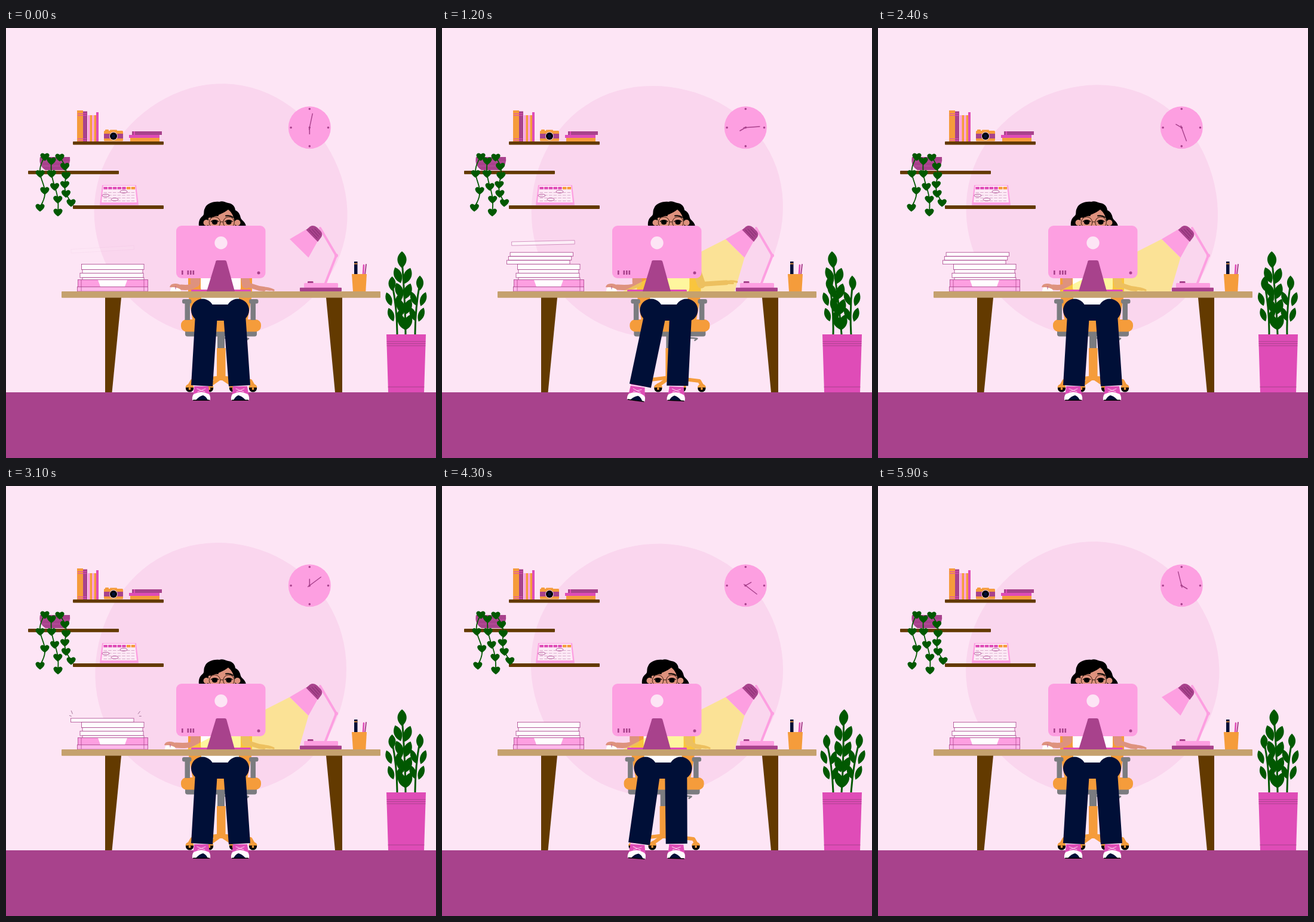
An HTML page that plays this animation: 720 by 720 pixels, repeating every 6 s.

```html
<!DOCTYPE html>
<html lang="en">
<head>
<meta charset="utf-8">
<title>Desk</title>
<style>
html,body{margin:0;width:100%;height:100%;overflow:hidden;background:#fde5f5}
svg{display:block;width:100vw;height:100vh}
</style>
</head>
<body>
<svg id="stage" viewBox="0 0 720 720"></svg>
<script>
const C = {bg:'#fde5f5', blob:'#fad6ee', floor:'#a8428c', desk:'#c5a16e', wood:'#633a00', pink:'#fd9fe1',
  mag:'#df4cb7', org:'#f59c3b', navy:'#000f37', green:'#015801', skin:'#de927e', gray:'#7b7c80', white:'#fffdfe'};
const LOOP = 6000, TAU = 2 * Math.PI;
const stage = document.getElementById('stage');

const mix = (a, b, k) => a + (b - a) * k;
const mixPt = (a, b, k) => a.map((v, i) => mix(v, b[i], k));
const times = (n, f) => Array.from({length: n}, (_, i) => f(i)).join('');

const rect = (x, y, w, h, f, r = 0, more = '') => `<rect x="${x}" y="${y}" width="${w}" height="${h}" fill="${f}" rx="${r}" ${more}/>`;
const poly = (p, f, more = '') => `<polygon points="${p}" fill="${f}" ${more}/>`;
const circ = (x, y, r, f, more = '') => `<circle cx="${x}" cy="${y}" r="${r}" fill="${f}" ${more}/>`;
const path = (d, f, more = '') => `<path d="${d}" fill="${f}" ${more}/>`;
const line = (d, c, w, more = '') => path(d, 'none', `stroke="${c}" stroke-width="${w}" stroke-linecap="round" stroke-linejoin="round" ${more}`);
const group = (id, s) => `<g id="${id}">${s}</g>`;
const thin = `stroke="${C.floor}" stroke-width=".8"`;
const paper = (x, y, w, h, f = C.white) => rect(x, y, w, h, f, 0, thin);

function books() {
  const stripe = (x, y, w) => rect(x, y, w, 1, C.mag);
  return rect(119, 138, 10, 52, C.org) + rect(129, 139.5, 7, 50.5, C.floor) + rect(151, 141, 4, 49, C.mag) +
    times(4, i => rect(137 + i * 3.5, 146, 3.5, 44, i % 2 ? C.org : C.pink)) +
    times(4, i => stripe(120, 143 + i * 3 + (i > 1 ? 36 : 0), 15)) +
    rect(211, 173, 50, 6, C.floor) + rect(206, 179, 51, 5, C.mag) + rect(208, 184, 49, 6, C.org) + rect(214, 173, 2, 6, C.mag);
}

function camera() {
  return rect(166, 170, 6, 4, C.org, 1) + rect(174, 170.5, 12, 4, C.org, 1) + rect(164, 172, 32, 17.5, C.org, 1.5) +
    rect(164, 177, 32, 8, C.floor) + circ(180, 181, 7, '#e9c6dc') + circ(180, 181, 6, '#000') + circ(180, 181, 3, C.navy);
}

function calendar() {
  const cell = i => rect(163.5 + i * 7.7, 266, 6.4, 4.2, i < 5 ? C.mag : C.org) +
    times(4, j => rect(163.5 + i * 7.7, 275 + j * 4.7, 5.5, .7, '#c98fb8'));
  const ring = (x, y) => `<ellipse cx="${x}" cy="${y}" rx="6" ry="2.4" fill="none" ${thin}/>`;
  return poly('161,263 218,263 222,296.5 157,296.5', C.pink) + poly('163,264 216,264 219,292 160,292', '#fdeaf6') +
    times(7, cell) + ring(197, 274) + ring(167, 280.5) + ring(182, 287);
}

const heart = (x, y, s = 7.5) => path('M0 1Q-1.15 .2 -1 -.4Q-.6 -1 0 -.5Q.6 -1 1 -.4Q1.15 .2 0 1Z', C.green,
  `transform="translate(${x} ${y}) scale(${s})"`);

// hearts hung at even steps along a wavy stem
function strand(id, a, b, n, wave) {
  const at = u => [mix(a[0], b[0], u) - wave * Math.sin(TAU * u), mix(a[1], b[1], u)];
  let d = 'M' + a;
  for (let u = .05; u < 1; u += .05) d += 'L' + at(u);
  return group(id, line(d, C.green, 1.8) + times(n, i => heart(...at(i / (n - 1)))));
}

function vines() {
  return path('M57 216H107Q109 229 98 238H66Q54 230 57 216Z', C.floor) + line('M58 224H106M60 231H104', '#c05aa8', .7) +
    strand('vineL', [65, 215], [57, 300], 4, 6) + strand('vineM', [76, 222], [87, 308], 5, 2.5) + strand('vineR', [90, 216], [109, 292], 6, -5);
}

const leaf = (x, y, len, wid, rot) => path(
  `M0 ${-len}C${wid * 1.4} ${-len * .4} ${wid * 1.3} ${len * .4} 0 ${len}C${-wid * 1.3} ${len * .4} ${-wid * 1.4} ${-len * .4} 0 ${-len}Z`,
  C.green, `transform="translate(${x} ${y}) rotate(${rot})"`);

// pairs of leaves at even steps below the tip
function branch(id, foot, tip, y, pairs, len, wid) {
  const pair = i => {
    const ly = y + 26 * (i + 1), x = mix(tip, foot, (ly - y) / (513 - y)), out = 8 - i;
    return leaf(x - out, ly, len, wid, -20) + leaf(x + out, ly + 1, len, wid, 20);
  };
  return group(id, line(`M${foot} 514Q${foot} 470 ${tip} ${y}`, C.green, 3) + leaf(tip, y, len, wid + 1, 0) + times(pairs, pair));
}

function plant() {
  return branch('stemL', 655, 646.5, 428, 2, 12, 5) + branch('stemR', 685, 693, 427, 2, 12.5, 5) + branch('stemC', 669, 663, 388, 4, 14, 6.5) +
    poly('637,513 703,513 700,610 640,610', C.mag) + times(3, i => line(`M638 ${525 + i * 3.5}H702`, C.floor, 1)) + line('M640 601H700', C.floor, 1);
}

function clock() {
  const dot = i => circ(508.3 + 31.2 * Math.cos(i * TAU / 4), 166.7 + 31.2 * Math.sin(i * TAU / 4), 1.8, C.floor);
  return circ(508.3, 166.7, 35.5, C.pink) + times(4, dot) + circ(508.3, 166.7, 1.7, C.floor) +
    line('M508.3 168V156', C.floor, 1.6, 'id="hour"') + line('M508.3 170V143', C.floor, 1.4, 'id="minute"');
}

function papers() {
  const loose = i => {
    const x = 108.5 + 2.8 * i, y = 389 - 6.6 * i;
    return group('paper' + i, paper(x, y, 105.5, 6.3)) +
      group('spark' + i, line(`M${x - 2} ${y - 6}l2 5M${x - 5} ${y + 2}l3 1M${x + 113} ${y - 5}l-3 4M${x + 115} ${y + 3}h-3`, '#8d5a80', .8));
  };
  return times(4, loose) + paper(126.5, 395.5, 104.5, 9) + paper(128, 404.5, 101, 6) + paper(124, 410.5, 106, 7.5) + paper(128, 418, 103, 4) +
    paper(120.5, 421.5, 117, 12, C.pink) + poly('154,422 203,422 199,433 158,433', C.white) +
    paper(119.5, 433.3, 118, 7.7, '#fdb9ea') + line('M126 422V440M231 422V440', C.floor, .7);
}

function lamp() {
  return line('M526 335L553 381L535 427', C.pink, 4) + circ(553, 381, 3, C.pink) +
    poly('475,353.5 503,337 523,355 506.5,384.5', C.pink) +
    path('M502.5 338L509 332.5Q515 329 521 334L527 340Q531 345 528 350L522 358Z', C.floor) +
    times(3, i => line(`M${508 + i * 4.5} ${338 - i}l${13 - 2 * i} ${14 - 2 * i}`, '#7d2c68', 1)) +
    rect(505, 424, 9.5, 4, C.floor, 1) + rect(499, 427, 57, 8, C.pink, 1.5) + rect(492, 434.8, 70, 6.3, C.floor, 1);
}

function cup() {
  return rect(583, 391, 5.5, 22, C.navy) + rect(583, 394, 5.5, 1.5, C.org) + line('M599 397l-1 16', C.mag, 2.6) +
    line('M603 396l-2 17', C.floor, 2) + poly('579,412 604,412 602.3,441 581,441', C.org);
}

const chairBack = () => path('M316 355H401Q412 355 412 366V446L404 492H313L305 446V366Q305 355 316 355Z', C.org);

function chairBase() {
  const caster = i => {
    const side = i % 2 ? 1 : -1, x = 360.5 + side * (i < 2 ? 53 : 20);
    return line(`M360 585L${x - side * 4} ${i < 2 ? 591 : 596}L${x} 598`, C.org, 6) +
      circ(x, 603, 6.6, '#000') + path(`M${x - 7} 602a7 6 0 0 1 14 0Z`, C.org) + circ(x, 604, 2, C.org);
  };
  const armrest = i => rect(295 + i * 112, 454, 15.5, 7.5, C.gray, 3) + rect(299.5 + i * 110, 460, 8.5, 29, C.gray);
  return rect(300, 505, 120, 11.5, C.gray, 4) + rect(354, 508, 12, 30, C.gray) + line('M366 519H394Q400 519 406 520L402 523', C.gray, 2.5) +
    rect(353, 536, 14.5, 54, C.org) + times(4, caster) + rect(293, 488, 134, 20.5, C.org, 9) + times(2, armrest) + rect(327, 450, 63, 30, C.white);
}

function head() {
  const eye = x => `<ellipse cx="${x}" cy="325.5" rx="4.6" ry="3.8" fill="#000"/>` +
    line(`M${x - 6} 324Q${x} 319.5 ${x + 6} 324`, '#000', 1.5) + circ(x, 325.5, 9.3, 'none', 'stroke="#3a1c10" stroke-width="1"');
  return path('M323 332C322 323 325 318 329 315C333 312 330 307 333 302C336 294 346 290 357 291C363 289 367 292 372 293C379 294 383 298 384 305C390 308 392 313 393 318C395 323 400 323 402 332L388 338H340Z', '#000') +
    circ(335.5, 326, 5, C.skin) + circ(387.5, 326, 5, C.skin) +
    path('M339 340V318C350 316 365 310 372 304C378 309 384 316 384 340Z', C.skin) +
    line('M343 317Q348 313 355 314M368 314.5Q375 313 380 317', '#000', 1.8) + eye(349.5) + eye(373) +
    line('M359 325Q361 323.5 363.5 325', '#3a1c10', 1);
}

function monitor() {
  return rect(310, 438, 100, 3.5, C.mag, 1.5) + rect(285, 331, 149.5, 88, C.pink, 9) + circ(360, 359.7, 10.7, C.bg) +
    rect(294, 406, 2.6, 7, C.floor) + times(3, i => rect(303.5 + i * 4.5, 406, 2.6, 7, C.floor)) + circ(423, 410, 2.5, C.floor) +
    path('M351 392Q351 389 354 389H366Q369 389 369.5 392L383 441H336Z', C.floor);
}

function shoe(id, dir) {
  return group(id, rect(-12, -8, 24, 16, '#fdd5ef') + times(2, i => rect(-12, -4 + 4 * i, 24, 2, C.mag)) +
    path('M-12 1H12L15 18H-14Z', C.mag) + line('M-7 4L6 9M7 4L-6 9', '#fdd5ef', 1) +
    path('M-15 23Q-16 13 -10 12Q0 7 10 12Q16 13 15 23Z', C.white) +
    path(`M${-9 * dir} 23Q${-3 * dir} 16 ${3 * dir} 15Q${8 * dir} 17 ${11 * dir} 23Z`, C.navy) + rect(-14, 22.5, 28, 1.5, '#000', .7));
}

stage.innerHTML = rect(0, 0, 720, 720, C.bg) + path('', C.blob, 'id="blob"') + rect(0, 610, 720, 110, C.floor) +
  rect(112, 190, 152, 5.5, C.wood, 1) + rect(37, 239, 152, 5.8, C.wood, 1) + rect(112, 297, 152, 6, C.wood, 1) +
  books() + camera() + calendar() + vines() + clock() + papers() +
  group('back', chairBack() + rect(326, 385, 67, 60, C.white, 10)) + group('head', head()) +
  line('', C.skin, 16, 'id="armL"') + line('', C.skin, 9, 'id="foreL"') +
  group('mouse', path('M275 441Q274 433 284 432.5Q293 433 293 441Z', C.white) +
    path('M274 434Q275 428 283 428Q290 428 295 432L293 438Q286 434 280 434Z', C.skin) + line('M284 433V437', C.floor, .9)) +
  line('', C.skin, 14, 'id="armR"') + line('', C.skin, 8, 'id="foreR"') + line('', C.skin, 3.4, 'id="fingers"') +
  line('', C.white, 17, 'id="sleeve"') + line('', C.floor, 2.5, 'id="cuff"') +
  poly('475,353.5 506.5,384.5 490,441 303,441', '#fef040', 'id="light" opacity=".5"') +
  lamp() + cup() + monitor() +
  group('chair', chairBase()) + shoe('shoeL', 1) + shoe('shoeR', -1) + path('', C.navy, 'id="pants"') +
  rect(93, 441, 534, 10.7, C.desk, 1) + poly('166,451.5 193,451.5 177.5,610 166,610', C.wood) +
  poly('536,451.5 563,451.5 563,610 551,610', C.wood) + plant();

const el = {};
stage.querySelectorAll('[id]').forEach(e => el[e.id] = e);
const set = (id, name, v) => el[id].setAttribute(name, v);
const move = (id, v) => set(id, 'transform', v);
const show = (id, on) => set(id, 'visibility', on ? 'visible' : 'hidden');
const clamp = x => Math.max(0, Math.min(1, x));
const ramp = (t, a, b) => { const x = clamp((t - a) / (b - a)); return x * x * (3 - 2 * x); };
const pulse = (t, a, b, c, d) => ramp(t, a, b) - ramp(t, c, d);
// shift by dx at distance h from the fixed height y0
const lean = (id, dx, y0, h) => move(id, `translate(0 ${y0}) skewX(${Math.atan(dx / h) * 360 / TAU}) translate(0 ${-y0})`);

function blobPath(t) {
  const w = TAU * t / LOOP, p = [];
  for (let a = 0; a < TAU; a += TAU / 90) {
    const r = 211 + 1.3 * Math.sin(3 * a + 2 * w) + 1.2 * Math.sin(4 * a - 3 * w + 1);
    p.push((359.5 + r * Math.cos(a)).toFixed(1) + ' ' + (306.5 + r * Math.sin(a)).toFixed(1));
  }
  return 'M' + p.join('L') + 'Z';
}

function drawArms(t, k) {
  const mx = -9 * pulse(t, 2700, 2950, 3300, 3550), ex = 317 + 15 * k;
  move('mouse', `translate(${mx} 0)`);
  set('armL', 'd', `M${ex} 405V426`);
  set('foreL', 'd', `M${ex} 429Q${ex - 6} 436 ${293 + mx} 434`);

  const lift = pulse(t, 150, 700, 1050, 1500) + pulse(t, 4300, 4700, 5200, 5650);
  const reach = pulse(t, 700, 900, 1050, 1450) + pulse(t, 4600, 4900, 5150, 5500);
  const s = [396 + 34 * k + 5 * reach, 392], e = [402 + 34 * k + 15 * reach, 429];
  const w = mixPt(mixPt([424, 436], [456, 423], lift), [478, 427], reach);
  const f = mixPt(mixPt([448, 439], [479, 422], lift), [504, 424.5], reach);
  const m = mixPt(w, f, .5), thumb = mixPt(w, f, .75);
  set('armR', 'd', `M${s}L${e}`);
  set('foreR', 'd', `M${e}Q${mixPt(e, w, .5)} ${w}L${mixPt(w, f, .3)}`);
  set('fingers', 'd', `M${w}Q${m[0]} ${m[1] - 4} ${f}M${w}L${thumb[0]} ${thumb[1] + 2.5 * lift}`);
  set('sleeve', 'd', `M${s[0] - 8} 372L${s[0] + 1} 393`);
  set('cuff', 'd', `M${s[0] - 6} 404L${s[0] + 11} 398`);
}

// the hips ride with the chair, the hems stay near the shoes
function drawLegs(k) {
  const dx = 33 * k;
  const knee = x => `M${x - 19} 472.5a19 19 0 1 1 38 0a19 19 0 1 1 -38 0Z`;
  const leg = (hip, hem, tilt) => `M${hip} 480H${hip + 37}L${hem + 36} ${599 + tilt}L${hem} ${599 - tilt}Z`;
  set('pants', 'd', knee(329 + dx) + knee(388 + dx) + `M${329 + dx} 463H${388 + dx}V490H${329 + dx}Z` +
    leg(317 + dx, 310 + 6 * k, 1 + 4 * k) + leg(364 + .8 * dx, 373 + 5 * k, -1 + 2 * k));
  move('shoeL', `translate(${327 + k} ${600 + k}) rotate(${12 * k})`);
  move('shoeR', `translate(${392 + k} ${600 + k}) rotate(${4 * k})`);
}

// sheets drop one by one, then vanish from the top
function drawPapers(t) {
  for (let i = 0; i < 4; i++) {
    const p = clamp((t + 50 - 350 * i) / 300), out = 3500 - 450 * i;
    show('paper' + i, p > 0 && t < out);
    set('paper' + i, 'opacity', p * p * (2 - p));
    move('paper' + i, `translate(0 ${-22 * (1 - p * p)}) rotate(${-4 * (1 - p)} 160 385)`);
    show('spark' + i, t >= out && t < out + 150);
  }
}

function draw(t) {
  const k = pulse(t, 100, 600, 1000, 1500) + pulse(t, 4100, 4600, 5200, 5650);
  const wave = Math.sin(TAU * t / LOOP), sway = -10 * wave * Math.abs(wave);
  set('blob', 'd', blobPath(t));
  move('back', `translate(${33 * k} 0)`);
  move('chair', `translate(${33 * k} 0)`);
  move('head', `translate(${34 * k} 0)`);
  drawArms(t, k);
  drawLegs(k);
  drawPapers(t);
  show('light', t >= 950 && t < 5050);
  lean('stemC', sway, 513, -125);
  lean('stemL', -.25 * sway, 513, -86);
  lean('stemR', .6 * sway, 513, -86);
  lean('vineL', .3 * sway, 215, 85);
  lean('vineM', .3 * sway, 215, 93);
  lean('vineR', .5 * sway, 215, 77);
  move('hour', `rotate(${180 + 60 * Math.floor(t / 1030)} 508.3 166.7)`);
  move('minute', `rotate(${12 + .3617 * t} 508.3 166.7)`);
}

const start = performance.now();
function tick() {
  const t = (performance.now() - start) % LOOP;
  draw(Math.floor(t / 100) * 100);
  requestAnimationFrame(tick);
}
draw(0);
requestAnimationFrame(tick);
</script>
</body>
</html>
```
